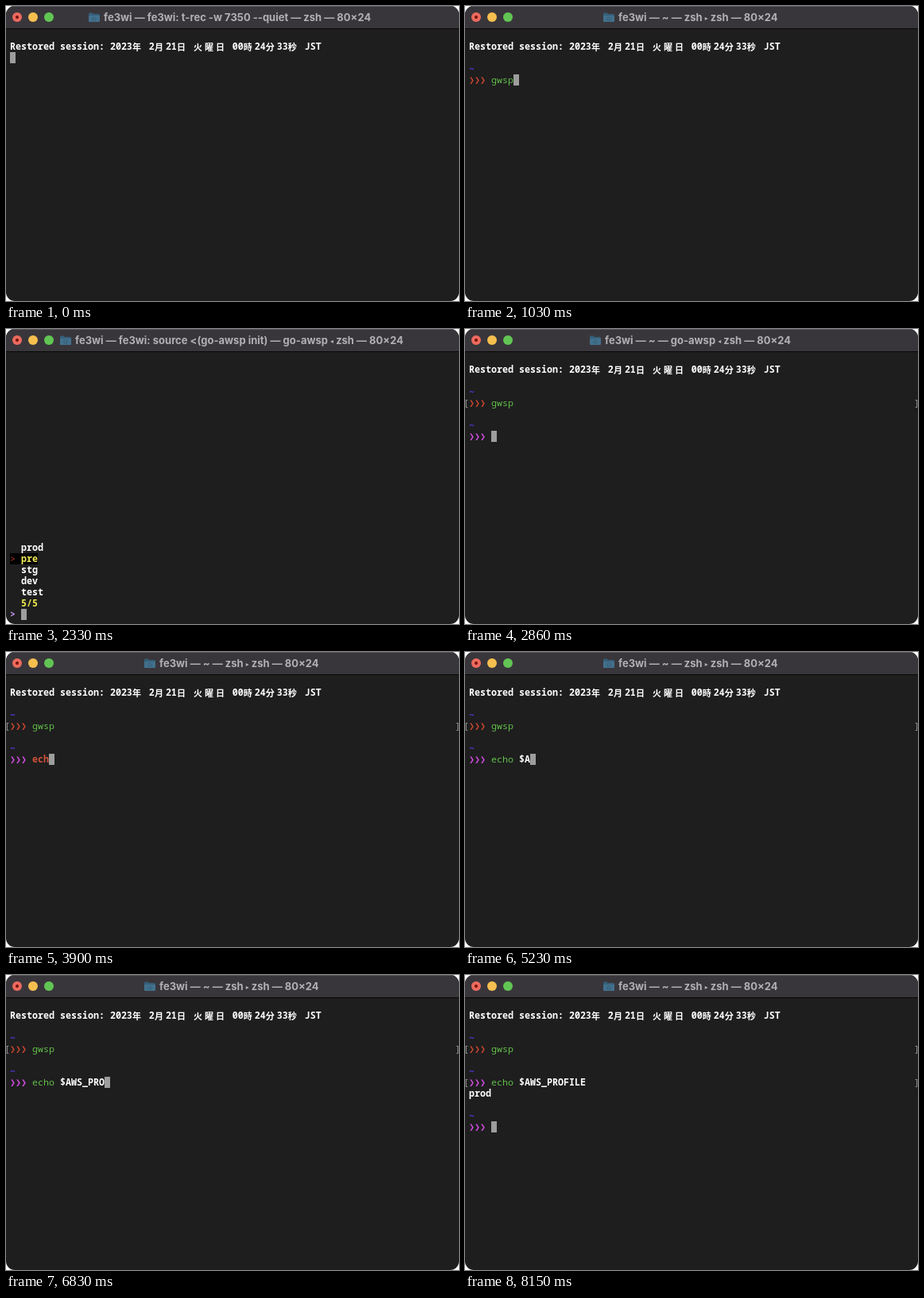
Write an HTML page that moves like this. It is 570 px wide and 371 px high and loops after 8.41 s.

```html
<!DOCTYPE html>
<html lang="en">
<head>
<meta charset="utf-8">
<title>Terminal</title>
<style>
html, body { margin: 0; width: 100%; height: 100%; overflow: hidden; background: #fff; }
#win { position: relative; width: 570px; height: 371px; overflow: hidden; border-radius: 11px; background: #1e1e1e; }
#bar { position: absolute; inset: 0 0 auto; height: 28px; background: #39363b; border-bottom: 1px solid #080808; box-shadow: inset 0 1px #59565b; }
#bar i { position: absolute; top: 8px; width: 12px; height: 12px; border-radius: 50%; }
#head { position: absolute; top: 0; display: flex; white-space: pre; font: 700 13px/28px Inter, "DejaVu Sans", sans-serif; color: #b3b0b4; }
#head svg { width: 14px; height: 12px; margin: 8px 5px 0 0; }
#head small { display: inline-block; font-size: 8px; vertical-align: 1px; line-height: 1; }
#term { position: absolute; left: 5px; top: 30px; font: 600 11.667px/14px "Noto Sans Mono", "DejaVu Sans Mono", monospace; color: #fff; }
.row { position: absolute; left: 0; height: 14px; white-space: pre; }
.row span { display: inline-block; height: 14px; vertical-align: top; }
.wide { width: 14px; font-family: "Noto Sans CJK JP", "Noto Sans CJK", sans-serif; font-size: 11px; }
.arrow { width: 7px; font-family: "DejaVu Sans Mono", monospace; font-weight: 700; }
.cursor { width: 7px; background: #9d9d9d; }
.red { color: #c8452f; }
.pink { color: #d24be0; }
.blue { color: #4f3df0; font-weight: 700; }
.bad { color: #d0513b; font-weight: 700; }
.ok { color: #62bf4a; font-weight: 500; }
.yellow { color: #ece84e; }
.violet { color: #c596ee; }
.pick { background: #000; color: #f3ee55; font-weight: 700; }
.pick .red { color: #c03a26; font-weight: 500; }
.mark { position: absolute; color: #9a9a9a; font-weight: 400; }
</style>
</head>
<body>
<div id="win">
  <div id="bar">
    <i style="left:8px;background:radial-gradient(circle,#7d1710 1.6px,#ec6a5e 2.4px)"></i>
    <i style="left:28px;background:#f4bf4f"></i>
    <i style="left:48px;background:#61c554"></i>
    <div id="head">
      <svg viewBox="0 0 14 12"><path d="M0 2Q0 .5 1.5 .5H4.5L6 2H12.500Q14 2 14 3.500V10.500Q14 12 12.500 12H1.500Q0 12 0 10.500Z" fill="#355f79"/><path d="M0 4H14V10.500Q14 12 12.500 12H1.500Q0 12 0 10.500Z" fill="#42708c"/><path d="M4.500 8 7 5.700 9.500 8M5.300 7.500V10H8.700V7.500" fill="none" stroke="#355f79"/></svg>
      <div id="title"></div>
    </div>
  </div>
  <div id="term"></div>
</div>
<script>
const LOOP = 8410;
const user = 'fe3wi';
const titles = {
  record: [104, `${user} — ${user}: t-rec -w 7350 --quiet — zsh`],
  idle: [174, `${user} — ~ — zsh ▸ zsh`],
  init: [68, `${user} — ${user}: source <(go-awsp init) — go-awsp ◂ zsh`],
  done: [157, `${user} — ~ — go-awsp ◂ zsh`]
};
const profiles = ['test', 'dev', 'stg', 'pre', 'prod'];
const command = 'echo $AWS_PROFILE';

const span = (cls, text = '') => `<span class="${cls}">${text}</span>`;
const row = (n, html) => `<div class="row" style="top:${n * 14}px">${html}</div>`;
const cursor = span('cursor');
const mark = (ch, col) => `<span class="mark" style="left:${col * 7}px">${ch}</span>`;
const marks = mark('[', -1) + mark(']', 80);
const session = row(1, 'Restored session: 2023年 2月21日 火曜日 00時24分33秒 JST'
  .replace(/[^\x00-\x7f]/g, ch => span('wide', ch)));

// The first word is red until it forms a complete command.
function typed(text) {
  const [word, ...rest] = text.split(' ');
  return (word ? span(word.length < 4 ? 'bad' : 'ok', word) : '')
    + (rest.length ? ' ' + rest.join(' ') : '');
}
function prompt(n, color, text, entered) {
  const arrows = span('arrow ' + color, '❯').repeat(3);
  return row(n, span('blue', '~'))
    + row(n + 1, arrows + ' ' + typed(text) + (entered ? marks : cursor));
}
const first = n => session + prompt(3, 'red', 'gwsp'.slice(0, n));
const ran = session + prompt(3, 'red', 'gwsp', true);
const second = n => ran + prompt(6, 'pink', command.slice(0, n));
const finish = ran + prompt(6, 'pink', command, true) + row(8, 'prod') + prompt(10, 'pink', '');
const menu = sel => profiles.map((name, i) => row(21 - i, i === sel
  ? span('pick', span('red', '&gt;') + ' ' + name) : '  ' + name)).join('')
  + row(22, '  ' + span('yellow', '5/5'))
  + row(23, span('violet', '&gt;') + ' ' + cursor);

const steps = [
  [0, 'record', session + row(2, cursor)],
  [250, 'idle', first(0)],
  [510, 'idle', first(1)],
  [770, 'idle', first(2)],
  [1030, 'idle', first(4)],
  [1290, 'init', ran + row(5, cursor)],
  ...[1550, 1810, 2070, 2330, 2600].map((t, i) => [t, 'init', menu(i)]),
  [2860, 'done', second(0)],
  [3120, 'idle', second(0)],
  ...[[3640, 1], [3900, 3], [4170, 4], [4440, 5], [4700, 6], [5230, 7], [5500, 8],
    [5770, 9], [6290, 10], [6560, 11], [6830, 13], [7100, 14], [7360, 15], [7620, 17]]
    .map(([t, n]) => [t, 'idle', second(n)]),
  [7890, 'idle', finish]
];

const [head, title, term] = ['head', 'title', 'term'].map(id => document.getElementById(id));
let shown;
function draw(now) {
  const t = now % LOOP;
  const step = steps.findLast(s => s[0] <= t);
  if (step !== shown) {
    shown = step;
    const [x, text] = titles[step[1]];
    head.style.left = x + 'px';
    title.innerHTML = (text + ' — 80×24').replace('<', '&lt;').replace(/[▸◂]/, '<small>$&</small>');
    term.innerHTML = step[2];
  }
  requestAnimationFrame(() => draw(performance.now()));
}
draw(performance.now());
</script>
</body>
</html>
```
